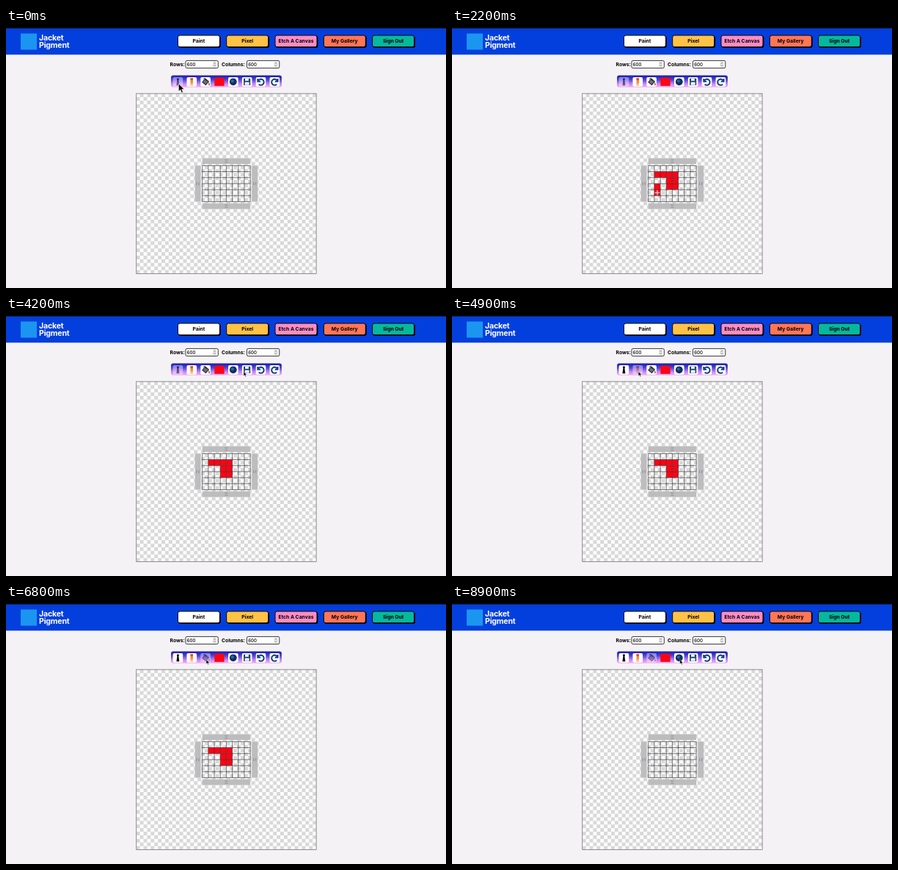
Recreate the animation shown at these times as an HTML page. Size 600 by 354 pixels, loop 9 s.

```html
<!DOCTYPE html>
<html lang="en">
<head>
<meta charset="utf-8">
<title>Jacket Pigment</title>
<style>
html, body { margin: 0; width: 100%; height: 100%; overflow: hidden; background: #f4f2f5; }
svg { display: block; width: 100%; height: 100%; }
text { font-family: Inter, "Open Sans", sans-serif; font-weight: 700; font-size: 6.8px; fill: #000; }
.brand { font-size: 10.6px; fill: #fff; letter-spacing: -.2px; }
.num { font-size: 6px; font-weight: 500; }
</style>
</head>
<body>
<svg viewBox="0 0 600 354">
  <defs>
    <linearGradient id="bar" x1="0" y1="0" x2="0" y2="1">
      <stop offset="0" stop-color="#1b1ba8"/>
      <stop offset=".35" stop-color="#4a42d8"/>
      <stop offset=".7" stop-color="#c583ef"/>
      <stop offset="1" stop-color="#f5b4f6"/>
    </linearGradient>
    <pattern id="check" x="177.7" y="89.2" width="9.816" height="9.816" patternUnits="userSpaceOnUse">
      <rect width="9.816" height="9.816" fill="#fcfcfc"/>
      <path d="M4.908 0h4.908v4.908H0v4.908h4.908z" fill="#d8d8d8"/>
    </pattern>
  </defs>
  <rect width="600" height="354" fill="#f4f2f5"/>
  <rect width="600" height="36.3" fill="#033fdd"/>
  <rect width="600" height="1" fill="#0b1f6b"/>
  <rect x="20" y="7.5" width="22" height="22" fill="#1a96f0"/>
  <text class="brand" x="45" y="17.3">Jacket</text>
  <text class="brand" x="45" y="27">Pigment</text>
  <g id="nav"></g>
  <g id="fields"></g>
  <rect x="225" y="64.5" width="151" height="16.2" rx="3" fill="url(#bar)"/>
  <g id="tools"></g>
  <rect x="177.7" y="89.2" width="245.4" height="245.4" fill="url(#check)" stroke="#777" stroke-width=".8"/>
  <g id="bars" fill="#bdbcbe"></g>
  <g id="cells" fill="#fb0414"></g>
  <path id="lines" fill="none" stroke="#2c2c2c" stroke-width=".62"/>
  <g id="cross" fill="none" stroke-linecap="round">
    <path d="M-3 0h6M0-3v6" stroke="#777" stroke-width="1.3" opacity=".4"/>
    <path d="M-3 0h6M0-3v6" stroke="#fff" stroke-width=".9"/>
  </g>
  <path id="arrow" d="M0 0V10.5L2.4 8.3 4.1 12.4 6 11.6 4.3 7.7H7.6Z" stroke="#fff" stroke-width=".6"/>
</svg>
<script>
const NS = 'http://www.w3.org/2000/svg';
const $ = id => document.getElementById(id);
function add(parent, tag, attrs, text) {
  const el = document.createElementNS(NS, tag);
  for (const k in attrs) el.setAttribute(k, attrs[k]);
  if (text) el.textContent = text;
  return parent.appendChild(el);
}
const rect = (p, x, y, width, height, fill, more) => add(p, 'rect', { x, y, width, height, fill, ...more });
const line = (p, d, stroke, width) => add(p, 'path', { d, fill: 'none', stroke, 'stroke-width': width });

// Navigation
[['Paint', '#fff'], ['Pixel', '#ffc247'], ['Etch A Canvas', '#fb8cc4'],
 ['My Gallery', '#ff7657'], ['Sign Out', '#06b89d']].forEach(([label, fill], i) => {
  const x = 234.4 + i * 66.3;
  rect($('nav'), x + .8, 10.7, 57.6, 16.3, '#000', { rx: 3 });
  rect($('nav'), x, 10, 57, 15.8, fill, { rx: 2.8, stroke: '#000', 'stroke-width': 1 });
  add($('nav'), 'text', { x: x + 28.5, y: 20.3, 'text-anchor': 'middle' }, label);
});

// Size fields
[['Rows:', 223.5, 245], ['Columns:', 294, 328.5]].forEach(([label, tx, x]) => {
  const g = $('fields');
  add(g, 'text', { x: tx, y: 51.6 }, label);
  rect(g, x, 44.4, 44.3, 10.2, '#fff', { rx: 1.8, stroke: '#222', 'stroke-width': .9 });
  add(g, 'text', { x: x + 1.8, y: 51.7, class: 'num' }, '600');
  rect(g, x + 37, 45.6, 5, 7.8, '#e6e6e6', { rx: 1.5 });
  line(g, `M${x + 38.2} 48.6l1.3-1.5 1.3 1.5m-2.6 1.8l1.3 1.5 1.3-1.5`, '#555', .6);
});

// Toolbar icons, drawn around their centre
const navy = '#123f80';
const turn = g => line(g, 'M-4.2-4.2V-.5H-.4M-3.8-1A4.1 4.1 0 1 1-2.8 3.4', navy, 2);
const icons = [
  g => {
    add(g, 'circle', { cy: -3.6, r: 1.5 });
    add(g, 'path', { d: 'M-.8-3H.8L2 5H-2z' });
  },
  g => {
    rect(g, -1.7, -5, 3.4, 10, '#f58a35');
    rect(g, -1.7, -5, 3.4, 2.6, '#e9412d');
    rect(g, -1.7, 2, 3.4, 3, '#f7c58c');
  },
  g => {
    rect(g, -3, -3, 6, 6, '#6b7078', { stroke: '#222', transform: 'rotate(40)' });
    line(g, 'M-3-3.5Q-1-7 1.2-1M3.6 1Q6 2 4.8 4.8', '#222', 1);
  },
  g => rect(g, -6.6, -5.5, 13.2, 11, '#fb0414'),
  g => {
    add(g, 'circle', { r: 4.9, fill: '#10305f' });
    add(g, 'circle', { cx: -1, cy: -1, r: 2, fill: '#2c64a8' });
  },
  g => {
    rect(g, -4.6, -4.6, 9.2, 9.2, '#24416e');
    rect(g, -2.6, -4.4, 4.8, 3, '#eef2f8');
    rect(g, -3, .4, 6, 4, '#eef2f8');
  },
  turn,
  g => turn(add(g, 'g', { transform: 'scale(-1 1)' }))
];
const toolX = i => 234.4 + i * 18.85;
const tools = icons.map((icon, i) => {
  const g = add($('tools'), 'g', { transform: `translate(${toolX(i)} 73.3)` });
  if (i !== 3) rect(g, -6.8, -6.3, 13.6, 12.8, '#fff', { rx: 1.8 });
  icon(g);
  return g;
});

// Drawing grid
const S = 8.18, X = 267.68, Y = 187.36, COLS = 8, ROWS = 6;
const W = S * COLS, H = S * ROWS;
for (const y of [Y - 10, Y + H + 2.2]) {
  rect($('bars'), X, y, W, 7.8);
  line($('bars'), `M${X + W / 2 - 2} ${y + 2.4}h4m-4 3h4`, '#777', .7);
}
for (const x of [X - 10, X + W + 2.2]) {
  rect($('bars'), x, Y, 7.8, H);
  line($('bars'), `M${x + 2.4} ${Y + H / 2 - 2}v4m3-4v4`, '#777', .7);
}
let lines = '';
for (let c = 0; c <= COLS; c++) lines += `M${X + c * S} ${Y}v${H}`;
for (let r = 0; r <= ROWS; r++) lines += `M${X} ${Y + r * S}h${W}`;
$('lines').setAttribute('d', lines);
const cells = {};
for (let c = 0; c < COLS; c++)
  for (let r = 0; r < ROWS; r++) cells[`${c}${r}`] = rect($('cells'), X + c * S, Y + r * S, S, S);

// Script: start, time per stop, action, stops (a tool "t0" or a cell as column and row)
const script = [
  [0, 200, 'pick', 't0 t0'],
  [1100, 0, 'rest', '15'],
  [1200, 40, 'paint', '11 21 32 33 43 42'],
  [1600, 200, 'paint', '31 41'],
  [2000, 0, 'rest', '41'],
  [2100, 100, 'paint', '13 14 25 35 55 65 64 74'],
  [3100, 0, 'rest', 't1'],
  [3500, 70, 'undo', 't6 t6 t6 t6 t6 t6 t6 t6'],
  [4800, 200, 'pick', 't1 t1'],
  [5300, 200, 'erase', '41 32'],
  [5600, 500, 'rest', '34 44'],
  [6400, 100, 'undo', 't6 t6'],
  [6800, 200, 'pick', 't2 t2'],
  [7400, 0, 'fill', '42'],
  [7700, 200, 'rest', '41 41'],
  [8300, 0, 'undo', 't6'],
  [8500, 0, 'redo', 't7'],
  [8700, 0, 'rest', 't4'],
  [8900, 0, 'clear', 't4'],
  [9000, 0, 'rest', 't4']
];
function place(name) {
  const [a, b] = name;
  return a === 't' ? [toolX(+b) + 1, 75.8] : [X + (+a + .5) * S, Y + (+b + .5) * S];
}
const stops = script.flatMap(([start, step, action, route]) =>
  route.split(' ').map((name, i) => ({ t: start + i * step, action, name, at: place(name) })));

function stateAt(t) {
  const history = [[]];
  let now = 0, tool = 0;
  const edit = list => { history.length = ++now; history.push(list); };
  for (const s of stops) {
    if (s.t > t) break;
    const red = history[now];
    if (s.action === 'pick') tool = +s.name[1];
    if (s.action === 'paint') edit([...red, s.name]);
    if (s.action === 'erase') edit(red.filter(id => id !== s.name));
    if (s.action === 'fill') edit(Object.keys(cells));
    if (s.action === 'clear') edit([]);
    if (s.action === 'undo') now--;
    if (s.action === 'redo') now++;
  }
  return { red: history[now], tool };
}
function pointer(t) {
  const i = stops.findIndex(s => s.t > t);
  const a = stops[i - 1], b = stops[i];
  const k = (t - a.t) / (b.t - a.t);
  return a.at.map((v, n) => v + (b.at[n] - v) * k);
}

const LOOP = 9000, STEP = 100;
function draw(t) {
  const { red, tool } = stateAt(t);
  for (const id in cells) cells[id].style.display = red.includes(id) ? '' : 'none';
  tools.forEach((g, i) => g.setAttribute('opacity', i === tool ? .42 : 1));

  const [x, y] = pointer(t);
  const drawing = y > 89;
  $('cross').style.display = drawing ? '' : 'none';
  $('arrow').style.display = drawing ? 'none' : '';
  $('cross').setAttribute('transform', `translate(${x} ${y})`);
  $('arrow').setAttribute('transform', `translate(${x} ${y}) scale(${t < 300 ? 1 : .55})`);
}
const start = performance.now();
let shown = -1;
function tick() {
  const t = Math.floor((performance.now() - start) % LOOP / STEP) * STEP;
  if (t !== shown) draw(shown = t);
  requestAnimationFrame(tick);
}
tick();
</script>
</body>
</html>
```
